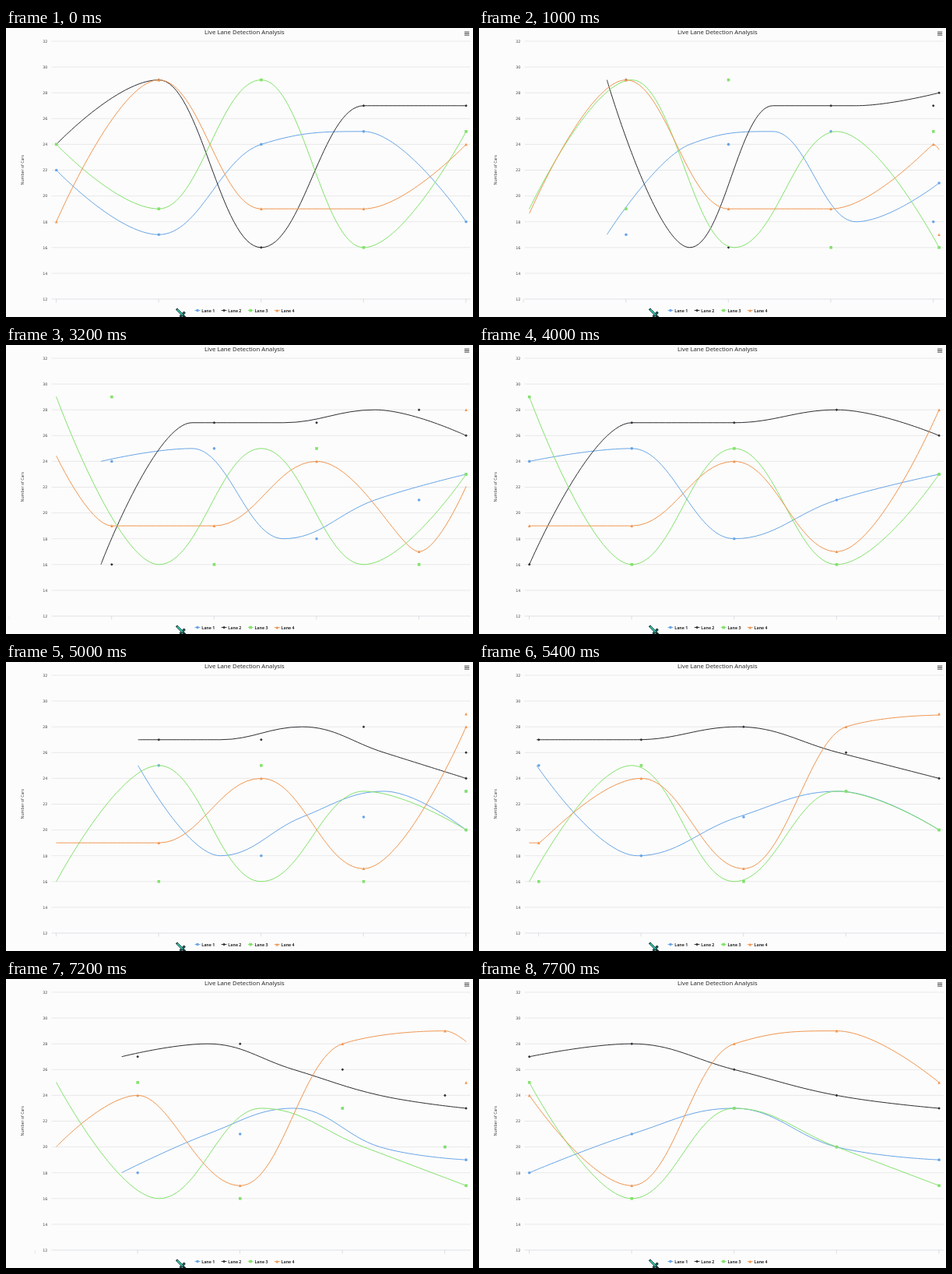
An HTML page that plays this animation: 600x371 px, repeating every 8 s.

```html
<!DOCTYPE html>
<html lang="en">
<head>
<meta charset="utf-8">
<title>Live Lane Detection Analysis</title>
<style>
  html, body { margin: 0; width: 100%; height: 100%; overflow: hidden; background: #fcfcfc; }
  svg { display: block; width: 600px; height: 371px; }
  text { font-family: "Noto Sans", "Open Sans", sans-serif; fill: #2b2b2b; }
  .title { font-size: 7.78px; text-anchor: middle; }
  .axis { font-size: 5.15px; text-anchor: middle; fill: #444; }
  .num { font: 4.8px "DejaVu Sans", sans-serif; text-anchor: end; fill: #444; }
  .legend { font-size: 5.25px; font-weight: 700; }
  .grid { stroke: #e4e4e4; stroke-width: .8; }
  .base, .tick { stroke: #d3d7de; stroke-width: .8; }
  .line { fill: none; stroke-width: 1; stroke-linejoin: round; stroke-linecap: round; }
  .menu { stroke: #555; stroke-width: 1.1; }
</style>
</head>
<body>
<svg id="chart" viewBox="0 0 600 371">
  <g id="grid"></g>
  <g id="ticks"></g>
  <text class="title" x="306.4" y="8">Live Lane Detection Analysis</text>
  <text class="axis" transform="translate(22.6 182.3) rotate(-90)">Number of Cars</text>
  <path class="menu" d="M589 5h6.2M589 7.1h6.2M589 9.2h6.2"/>
  <g id="series"></g>
  <g id="legend"></g>
  <g fill="none">
    <path d="M219 360.5L228 369.5M229.8 364.6L223.6 370.8M227 368.5L231 372.5" stroke="#17312f" stroke-width="3"/>
    <path d="M219.8 361.3L227.2 368.7" stroke="#35c9b0" stroke-width="1.7"/>
    <path d="M229 365.4L224.4 370" stroke="#1b8c7c" stroke-width="1"/>
  </g>
</svg>
<script>
const LOOP = 8000, STEP = 100, DURATION = 500;
const UPDATES = [924, 2963, 4998, 7050];
const LEFT = 64.7, GAP = 131.6, COUNT = 5;
const RIGHT = LEFT + GAP * (COUNT - 1);

const lanes = [
  { color: '#69a5e6', shape: 'circle', morph: 'squeeze', data: [22, 17, 24, 25, 18, 21, 23, 20, 19] },
  { color: '#2e2e33', shape: 'diamond', morph: 'squeeze', data: [24, 29, 16, 27, 27, 28, 26, 24, 23] },
  { color: '#83e26c', shape: 'square', morph: 'jump', data: [24, 19, 29, 16, 25, 16, 23, 20, 17] },
  { color: '#f0954f', shape: 'triangle', morph: 'shift', data: [18, 29, 19, 19, 24, 17, 28, 29, 25] }
];

const shapes = {
  circle: 'M-1.8 0a1.8 1.8 0 1 0 3.6 0a1.8 1.8 0 1 0 -3.6 0z',
  diamond: 'M0 -1.8L1.8 0L0 1.8L-1.8 0z',
  square: 'M-1.8 -1.8h3.6v3.6h-3.6z',
  triangle: 'M0 -1.8L1.8 1.8H-1.8z'
};

const byId = id => document.getElementById(id);
const lerp = (a, b, p) => a + (b - a) * p;
const yOf = v => 348 - (v - 12) * 16.55;

function add(parent, tag, attrs, text) {
  const el = document.createElementNS('http://www.w3.org/2000/svg', tag);
  for (const key in attrs) el.setAttribute(key, attrs[key]);
  if (text) el.textContent = text;
  return parent.appendChild(el);
}

// Smooth curve as cubic segments [c1x, c1y, c2x, c2y, x, y]; the first is the start point.
function spline(values, left, gap) {
  const pts = values.map((v, i) => ({ x: left + gap * i, y: yOf(v) }));
  let out = [pts[0].x, pts[0].y];
  return pts.map((pt, i) => {
    const { x, y } = pt, prev = pts[i - 1], next = pts[i + 1];
    if (!prev) return [x, y, x, y, x, y];
    const start = out;
    if (!next) return [...start, x, y, x, y];
    const lx = (1.5 * x + prev.x) / 2.5, rx = (1.5 * x + next.x) / 2.5;
    let ly = (1.5 * y + prev.y) / 2.5, ry = (1.5 * y + next.y) / 2.5;
    const fix = (ry - ly) * (rx - x) / (rx - lx) + y - ry;
    ly += fix;
    ry += fix;
    // keep the curve from overshooting its neighbours
    const clamp = (c, other) =>
      Math.min(Math.max(c, Math.min(other, y)), Math.max(other, y));
    const l = clamp(ly, prev.y);
    if (l !== ly) { ly = l; ry = 2 * y - ly; }
    const r = clamp(ry, next.y);
    if (r !== ry) { ry = r; ly = 2 * y - ry; }
    out = [rx, ry];
    return [...start, lx, ly, x, y];
  });
}

const dot = seg => [...seg.slice(4), ...seg.slice(4), ...seg.slice(4)];

function curve(lane, k, p) {
  const now = lane.data.slice(k, k + COUNT);
  const end = spline(now, LEFT, GAP);
  if (p >= 1 || lane.morph === 'jump') return end;
  if (lane.morph === 'squeeze') {
    const narrow = (RIGHT - LEFT) / COUNT;
    return spline(now, lerp(LEFT + narrow, LEFT, p), lerp(narrow, GAP, p));
  }
  const from = spline(lane.data.slice(k - 1, k - 1 + COUNT), LEFT, GAP);
  from.push(dot(from[COUNT - 1]));
  const to = [end[0], ...end];
  return from.map((seg, i) => seg.map((v, j) => lerp(v, to[i][j], p)));
}

const toPath = segs => segs.map((s, i) =>
  (i ? 'C' + s.map(v => v.toFixed(2)).join(' ') : `M${s[4]} ${s[5]}`)).join('');

for (let v = 12; v <= 32; v += 2) {
  const y = yOf(v);
  add(byId('grid'), 'path', { class: v === 12 ? 'base' : 'grid', d: `M58.7 ${y}H596.8` });
  add(byId('grid'), 'text', { class: 'num', x: 53.4, y: y + 1.8 }, String(v));
}

const ticks = Array.from({ length: COUNT + 1 }, () =>
  add(byId('ticks'), 'path', { class: 'tick', d: 'M0 348v4.4' }));

lanes.forEach((lane, i) => {
  const { color, shape } = lane;
  const g = byId('series');
  lane.line = add(g, 'path', { class: 'line', stroke: color });
  lane.marks = lane.data.slice(0, COUNT).map(() =>
    add(g, 'path', { d: shapes[shape], fill: color }));
  const x = 246 + 34.1 * i, y = 362.6, legend = byId('legend');
  add(legend, 'path', { class: 'line', stroke: color, d: `M${x - 3} ${y}h6` });
  add(legend, 'path', { d: shapes[shape], fill: color, transform: `translate(${x} ${y})` });
  add(legend, 'text', { class: 'legend', x: x + 5.2, y: y + 1.9 }, 'Lane ' + (i + 1));
});

function draw(time) {
  const k = UPDATES.filter(u => u <= time).length;
  const t = k ? Math.min(1, (time - UPDATES[k - 1]) / DURATION) : 1;
  const p = (1 - Math.cos(Math.PI * t)) / 2;
  const slide = GAP * (1 - p);

  ticks.forEach((tick, i) => {
    tick.setAttribute('transform', `translate(${LEFT - .2 + GAP * (i - 1) + slide} 0)`);
    tick.setAttribute('opacity', i === 0 ? 1 - p : i === COUNT ? p : 1);
  });
  for (const lane of lanes) {
    lane.line.setAttribute('d', toPath(curve(lane, k, p)));
    lane.marks.forEach((mark, i) => {
      const x = Math.min(RIGHT, LEFT + GAP * i + slide);
      mark.setAttribute('transform', `translate(${x} ${yOf(lane.data[k + i])})`);
    });
  }
}

const begin = performance.now();
let shown = -1;
function frame() {
  const time = Math.floor(((performance.now() - begin) % LOOP) / STEP) * STEP;
  if (time !== shown) draw(shown = time);
  requestAnimationFrame(frame);
}
frame();
</script>
</body>
</html>
```
